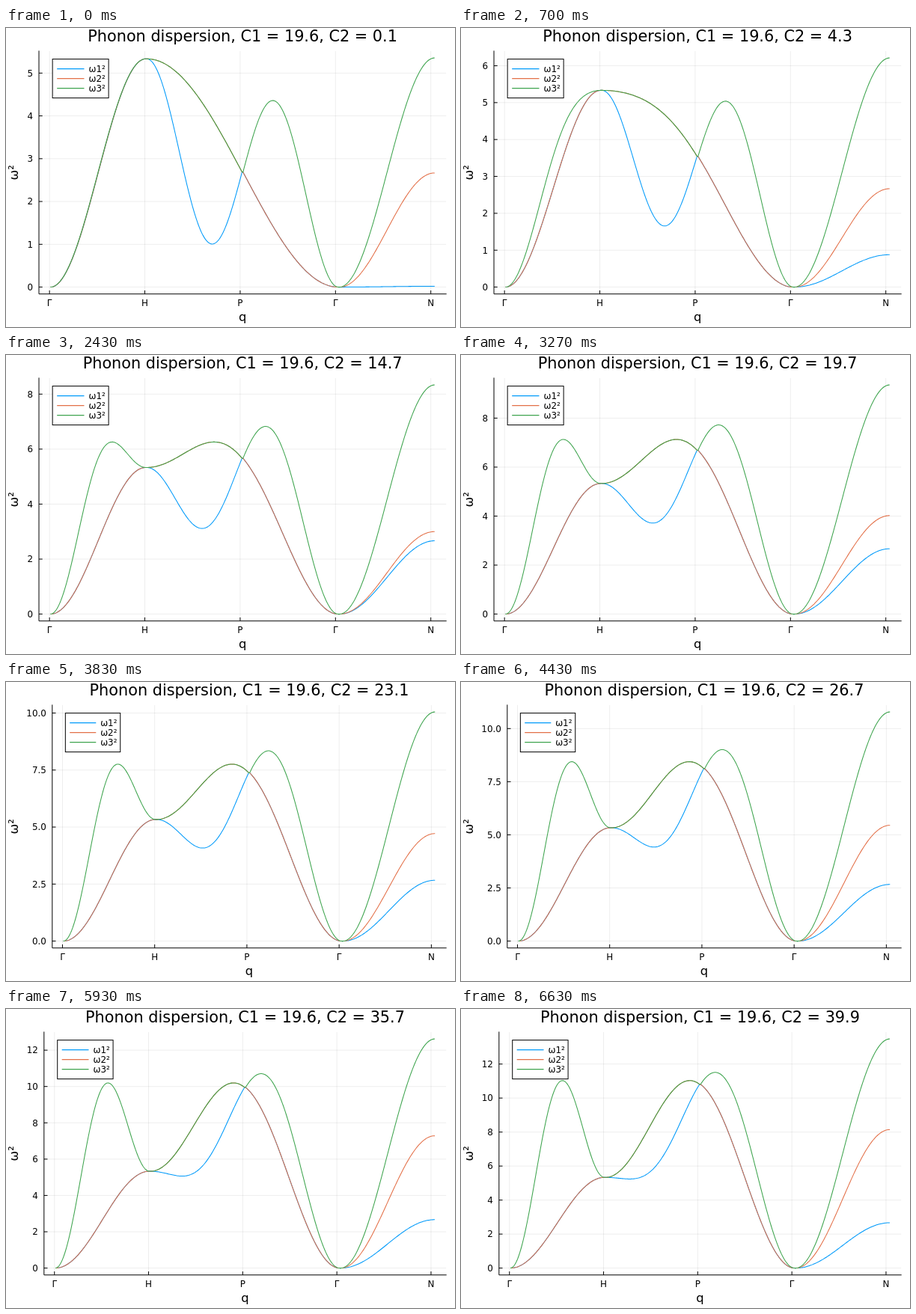
Recreate the animation shown at these times as an HTML page. Size 600 px wide and 400 px high, loop 6.66 s.

```html
<!DOCTYPE html>
<html lang="en">
<head>
<meta charset="utf-8">
<title>Phonon dispersion</title>
<style>
  html, body { margin: 0; width: 100%; height: 100%; overflow: hidden; background: #fff; }
  svg { display: block; width: 600px; height: 400px; }
  text { font-family: "DejaVu Sans", sans-serif; font-size: 11.9px; fill: #000; white-space: pre; }
  .title { font-size: 20.8px; }
  .label { font-size: 16.3px; }
  .mid { text-anchor: middle; }
  .end { text-anchor: end; }
  .grid { stroke: #000; stroke-opacity: .07; fill: none; }
  .axis { stroke: #000; fill: none; }
  .curve { fill: none; stroke-width: 1.05; stroke-linejoin: round; }
</style>
</head>
<body>
<svg id="chart" viewBox="0 0 600 400"></svg>
<script>
const LOOP = 6660;
const TOP = 30.87, BOTTOM = 355.8, RIGHT = 588.2, TICK = 4.7;
const COLORS = ["#009afa", "#e36f47", "#3ea44e"];
const NAMES = ["ω1²", "ω2²", "ω3²"];
const POINTS = ["Γ", "H", "P", "Γ", "N"];
const C1 = 19.6, MASS = 19.6, N = 101;
const A = 8 * C1 / (3 * MASS);
const X_MIN = 1 - 0.03 * 403, X_SPAN = 1.06 * 403;
const chart = document.getElementById("chart");

// Squared frequencies of a bcc lattice on each leg; b is the second-neighbour term.
const LEGS = [
  (t, b) => {
    const a = Math.PI * t, d = A * (1 - Math.cos(a));
    return [d, d, d + b * Math.sin(a) ** 2];
  },
  (t, b) => {
    const a = Math.PI * t / 2, c = Math.cos(a), s2 = Math.sin(a) ** 2;
    const d = A * (1 + c ** 3) + b * s2, o = A * s2 * c;
    return [d - 2 * o, d + o, d + o];
  },
  (t, b) => {
    const a = Math.PI * (1 - t) / 2, c = Math.cos(a), s2 = Math.sin(a) ** 2;
    const d = A * (1 - c ** 3) + b * s2, o = A * s2 * c;
    return [d - o, d - o, d + 2 * o];
  },
  (t, b) => {
    const s2 = Math.sin(Math.PI * t / 2) ** 2;
    return [b * s2, A * s2, (2 * A + b) * s2].sort((p, q) => p - q);
  }
];

const line = (cls, x1, y1, x2, y2, extra = "") =>
  `<path class="${cls}" d="M${x1} ${y1}L${x2} ${y2}" ${extra}/>`;
const text = (cls, x, y, s, extra = "") =>
  `<text class="${cls}" x="${x}" y="${y}" ${extra}>${s}</text>`;

function yStep(limit) {
  if (limit < 7) return 1;
  return limit >= 10 && limit < 12.5 ? 2.5 : 2;
}

function draw(k) {
  const c2 = 0.1 + 0.2 * k, b = 4 * c2 / MASS;
  const peak = 2 * A + b, limit = 1.03 * peak, step = yStep(limit);
  const left = step === 2.5 ? 61.8 : limit > 10 ? 50.8 : 44;
  const width = RIGHT - left, midX = (left + RIGHT) / 2, midY = (TOP + BOTTOM) / 2;
  const px = i => left + (i - X_MIN) / X_SPAN * width;
  const py = v => BOTTOM - (v + 0.03 * peak) / (1.06 * peak) * (BOTTOM - TOP);

  let grid = "", axes = "", labels = "", curves = "", legend = "";

  POINTS.forEach((name, i) => {
    const x = px(100 * i);
    grid += line("grid", x, TOP, x, BOTTOM);
    axes += line("axis", x, BOTTOM, x, BOTTOM - TICK);
    labels += text("mid", x, 371.8, name);
  });
  for (let v = 0; v <= limit; v += step) {
    const y = py(v);
    grid += line("grid", left, y, RIGHT, y);
    axes += line("axis", left, y, left + TICK, y);
    labels += text("end", left - 8, y + 4.3, v.toFixed(step === 2.5 ? 1 : 0));
  }
  axes += `<path class="axis" d="M${left} ${TOP}V${BOTTOM}H${RIGHT}" stroke-linecap="square"/>`;

  const paths = [[], [], []];
  LEGS.forEach((leg, n) => {
    for (let i = 0; i < N; i++) {
      const x = px(n * N + i + 1).toFixed(2);
      leg(i / (N - 1), b).forEach((v, j) => paths[j].push(x + " " + py(v).toFixed(2)));
    }
  });

  const boxX = left + width / 30, boxY = 41.6, pad = width / 90, key = width / 15;
  legend += `<rect class="axis" x="${boxX}" y="${boxY}" width="${key + 2 * pad + 26.6}" height="52" style="fill:#fff"/>`;
  COLORS.forEach((color, j) => {
    const y = boxY + 13 * (j + 1), stroke = `stroke="${color}"`;
    curves += `<path class="curve" ${stroke} d="M${paths[j].join("L")}"/>`;
    legend += line("curve", boxX + pad, y, boxX + pad + key, y, stroke);
    legend += text("", boxX + 2 * pad + key, y + 4.3, NAMES[j]);
  });

  labels += text("title mid", midX, 18.2, `Phonon dispersion, C1 = ${C1}, C2 = ${c2.toFixed(1)}`);
  labels += text("label mid", midX, 392, "q");
  labels += text("label mid", 0, 0, "ω²", `transform="translate(16 ${midY}) rotate(-90)"`);

  chart.innerHTML = grid + axes + labels + curves + legend;
}

// Three steps per 100 ms, on a 10 ms clock.
function stepAt(t) {
  const rest = t % 100;
  return 3 * Math.floor(t / 100) + (rest >= 70 ? 2 : rest >= 30 ? 1 : 0);
}

const start = performance.now();
let shown = -1;
function tick() {
  const k = stepAt((performance.now() - start) % LOOP);
  if (k !== shown) draw(shown = k);
  requestAnimationFrame(tick);
}
tick();
</script>
</body>
</html>
```
